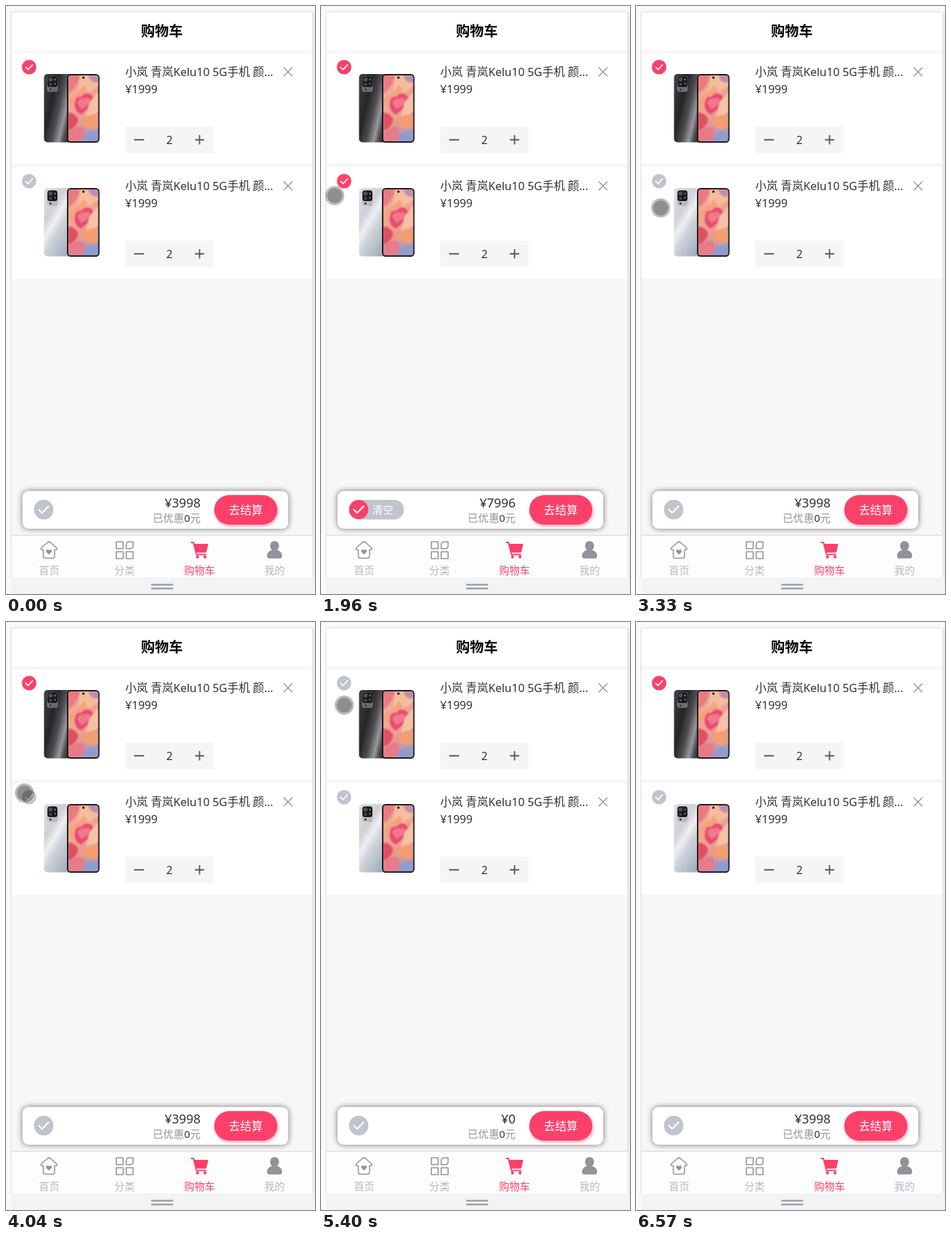
An HTML page that plays this animation: 451 by 856 pixels, repeating every 7.24 s.

```html
<!DOCTYPE html>
<html lang="zh-CN">
<head>
<meta charset="utf-8">
<title>购物车</title>
<style>
  html, body { margin: 0; width: 100%; height: 100%; overflow: hidden; background: #f8f9fa; }
  svg { display: block; width: 451px; height: 856px; }
  text { font-family: "Noto Sans", "Noto Sans CJK SC", sans-serif; font-size: 16.5px; fill: #303133; }
  .mid { text-anchor: middle; }
  .end { text-anchor: end; }
  .title { font-size: 20.3px; font-weight: 700; fill: #000; }
  .total { font-size: 18.4px; }
  .note { font-size: 15.3px; fill: #919398; }
  .tab { font-size: 15px; fill: #b4b9c2; }
  .pink { fill: #fb4069; }
  .gray { fill: #c0c4cd; }
  .white { fill: #fff; }
  .tick { fill: none; stroke: #fff; stroke-linecap: round; stroke-linejoin: round; }
  .bar { filter: drop-shadow(0 0 4px rgba(0, 0, 0, .55)); }
  .pay { filter: drop-shadow(1px 2px 2px rgba(251, 64, 105, .55)); }

  .both, .one, .none, .first, .cursor { animation: 7240ms step-end infinite; }
  .both { animation-name: both; }
  .one { animation-name: one; }
  .none { animation-name: none-left; }
  .first { animation-name: first; }
  .pill { animation: pill 7240ms linear infinite; }
  .clear { animation: clear 7240ms linear infinite; }
  .cursor { animation-name: seen; }
  .path { animation: path 7240ms step-end infinite; }

  @keyframes both { 0% { opacity: 0 } 19.751% { opacity: 1 } 43.094%, 100% { opacity: 0 } }
  @keyframes one {
    0% { opacity: 1 } 19.751% { opacity: 0 } 43.094% { opacity: 1 }
    69.061% { opacity: 0 } 78.453%, 100% { opacity: 1 }
  }
  @keyframes none-left { 0% { opacity: 0 } 69.061% { opacity: 1 } 78.453%, 100% { opacity: 0 } }
  @keyframes first { 0% { opacity: 1 } 69.061% { opacity: 0 } 78.453%, 100% { opacity: 1 } }
  @keyframes pill { 0%, 19.751% { width: 28px } 22.652%, 43.094% { width: 80px } 45.5%, 100% { width: 28px } }
  @keyframes clear { 0%, 20.7% { opacity: 0 } 22.652%, 43.094% { opacity: 1 } 44.5%, 100% { opacity: 0 } }
  @keyframes seen { 0% { opacity: 0 } 4.282% { opacity: 1 } 90.746%, 100% { opacity: 0 } }
  @keyframes path {
    0% { transform: translate(370px, 816px) }
    4.282% { transform: translate(370px, 816px); animation-timing-function: steps(3) }
    7.182% { transform: translate(244px, 590px); animation-timing-function: steps(2) }
    9.116% { transform: translate(130px, 432px) }
    10.083% { transform: translate(104px, 405px); animation-timing-function: steps(2) }
    12.017% { transform: translate(45px, 300px); animation-timing-function: steps(2) }
    14.088% { transform: translate(25px, 260px) }
    15.055% { transform: translate(29px, 257px) }
    17.818% { transform: translate(29px, 256px); animation-timing-function: steps(4) }
    21.685% { transform: translate(30px, 255px); animation-timing-function: steps(5) }
    27.072% { transform: translate(20px, 276px) }
    28.039% { transform: translate(21px, 275px); animation-timing-function: steps(4) }
    31.768% { transform: translate(25px, 268px); animation-timing-function: steps(6) }
    37.569% { transform: translate(36px, 253px) }
    42.127% { transform: translate(36px, 252px) }
    43.094% { transform: translate(36px, 253px); animation-timing-function: steps(3) }
    45.994% { transform: translate(36px, 294px); animation-timing-function: steps(3) }
    48.895% { transform: translate(44px, 408px); animation-timing-function: steps(4) }
    52.901% { transform: translate(36px, 277px); animation-timing-function: steps(3) }
    55.801% { transform: translate(27px, 249px); animation-timing-function: steps(2) }
    57.735% { transform: translate(15px, 215px); animation-timing-function: steps(2) }
    59.669% { transform: translate(16px, 150px); animation-timing-function: steps(3) }
    62.431% { transform: translate(39px, 97px); animation-timing-function: steps(3) }
    65.331% { transform: translate(36px, 92px) }
    68.094% { transform: translate(32px, 91px); animation-timing-function: steps(2) }
    69.89% { transform: translate(31px, 90px); animation-timing-function: steps(2) }
    71.823% { transform: translate(34px, 120px) }
    74.586% { transform: translate(34px, 121px); animation-timing-function: steps(4) }
    78.453% { transform: translate(35px, 93px) }
    80.387% { transform: translate(35px, 93px); animation-timing-function: steps(4) }
    83.978% { transform: translate(35px, 116px) }
    84.945% { transform: translate(50px, 135px) }
    85.912% { transform: translate(130px, 265px) }
    86.878% { transform: translate(258px, 445px); animation-timing-function: steps(2) }
    88.812% { transform: translate(416px, 665px) }
    89.779%, 100% { transform: translate(440px, 721px) }
  }
</style>
</head>
<body>
<svg viewBox="0 0 451 856" xmlns="http://www.w3.org/2000/svg">
  <defs>
    <linearGradient id="black" x1="0" y1=".2" x2="1" y2=".75">
      <stop offset="0" stop-color="#3c3c3f"/><stop offset=".3" stop-color="#252527"/>
      <stop offset=".52" stop-color="#4c4c50"/><stop offset=".72" stop-color="#97989b"/>
      <stop offset=".85" stop-color="#4a4a4d"/><stop offset="1" stop-color="#252527"/>
    </linearGradient>
    <linearGradient id="silver" x1="0" y1="0" x2=".7" y2="1">
      <stop offset="0" stop-color="#dfe0e3"/><stop offset=".35" stop-color="#cfd1d6"/>
      <stop offset=".5" stop-color="#eeeff1"/><stop offset=".65" stop-color="#cdd2d9"/>
      <stop offset="1" stop-color="#a3b0c0"/>
    </linearGradient>
    <linearGradient id="wall" x1="0" y1="0" x2=".4" y2="1">
      <stop offset="0" stop-color="#d98593"/><stop offset=".3" stop-color="#f2ac94"/>
      <stop offset=".7" stop-color="#ee9c90"/><stop offset="1" stop-color="#a79bc4"/>
    </linearGradient>
    <clipPath id="screen"><rect x="91" y="101" width="43.5" height="96" rx="3.5"/></clipPath>
    <filter id="soft"><feGaussianBlur stdDeviation=".9"/></filter>

    <g id="tick">
      <circle r="10.5"/>
      <path class="tick" stroke-width="1.7" d="M-5 .2-1.6 3.6 5-3.4"/>
    </g>
    <g id="big-tick">
      <circle r="14"/>
      <path class="tick" stroke-width="2.3" d="M-7 .3-2.3 5 7-4.6"/>
    </g>

    <g id="phone">
      <rect x="55.5" y="99" width="42" height="99.5" rx="5" style="fill:var(--back)"/>
      <rect x="60" y="102" width="15.5" height="23" rx="3.5" fill="#a4a6aa" fill-opacity=".55"/>
      <rect x="60.500" y="102.500" width="14.5" height="15.5" rx="3.5" fill="#17181b"/>
      <circle cx="65" cy="107" r="3" fill="#4d5057"/>
      <circle cx="65" cy="114" r="2.2" fill="#43464d"/>
      <circle cx="71.500" cy="107" r="1.5" fill="#6b6e74"/>
      <circle cx="71.500" cy="113" r="1.5" fill="#5d6066"/>
      <circle cx="65" cy="121.500" r="1.6" fill="#333539"/>
      <rect x="89" y="99" width="47.5" height="100" rx="5.5" fill="#19191b"/>
      <g clip-path="url(#screen)">
        <path fill="url(#wall)" d="M91 101h44v96H91z"/>
        <g filter="url(#soft)">
          <path fill="#e97a80" d="M91 101h17q-3 16-17 26z"/>
          <path fill="#f5bd9c" d="M108 101h27v15q-16 11-31 20z"/>
          <path fill="#c08db0" d="M120 101h15v10q-11 3-15-10z"/>
          <path fill="#f4a382" d="M91 135q14-8 23-20l6 9q-12 17-29 24z"/>
          <path fill="#e94c70" d="M100 143q1-13 10-11 7-9 15-2 7 9-3 18l-13 10q-9-5-9-15z"/>
          <path fill="#f2788c" d="M104 141q3-8 10-6 6-4 9 2-2 8-13 13z"/>
          <path fill="#f6c2a6" d="M122 140l13-15v29l-20 13z"/>
          <path fill="#df5060" d="M91 155q10 1 14 9 1 10-14 18z"/>
          <path fill="#f29d72" d="M109 170q8-14 26-12v20q-14 6-26-8z"/>
          <path fill="#e77b88" d="M91 184q12-12 21-7l8 20H91z"/>
          <path fill="#8f9bcb" d="M111 197q2-13 16-14l8 3v11z"/>
        </g>
      </g>
      <circle cx="113" cy="104.2" r="1.7" fill="#161618"/>
    </g>

    <g id="card">
      <use href="#phone"/>
      <text x="174" y="102">小岚 青岚Kelu10 5G手机 颜...</text>
      <text x="174" y="127">¥1999</text>
      <path d="M405.3 89.5 418 102.2M418 89.5 405.3 102.2" stroke="#909399" stroke-width="1.4"/>
      <path fill="#f5f5f5" d="M174 175.5h129V214H174z"/>
      <path d="M187 194.7h14.500M275.8 194.7h13.500M282.5 188v13.500" stroke="#55575b" stroke-width="1.9"/>
      <text class="mid" x="238.5" y="201" style="font-size:16px">2</text>
    </g>
  </defs>

  <path fill="#f8f9fa" d="M0 0h451v856H0z"/>
  <path fill="#eaecef" d="M447.5 9H451v823h-3.5z"/>
  <path fill="#f1f3f4" d="M8 832h443v24H8z"/>
  <path fill="#f7f7f7" d="M8 9h439.5v823H8z"/>
  <path fill="#fff" d="M8 9h439.5v55H8zM8 69h439.5v160H8zM8 235h439.5v162H8z"/>
  <path fill="none" stroke="#dcdddf" d="M7.5 832V8.5h440V832"/>
  <text class="mid title" x="227.5" y="44">购物车</text>

  <use href="#card" style="--back:url(#black)"/>
  <use href="#card" y="166" style="--back:url(#silver)"/>
  <use href="#tick" class="gray" x="33.7" y="89"/>
  <use href="#tick" class="pink first" x="33.7" y="89"/>
  <use href="#tick" class="gray" x="33.7" y="255"/>
  <use href="#tick" class="pink both" x="33.7" y="255"/>

  <rect class="bar white" x="24" y="706" width="388" height="55" rx="9"/>
  <rect class="gray pill" x="41" y="719" width="28" height="28.5" rx="14"/>
  <text class="clear white" x="75" y="739" style="font-size:15.3px">清空</text>
  <use href="#big-tick" class="gray" x="55" y="733"/>
  <use href="#big-tick" class="pink both" x="55" y="733"/>
  <text class="end total one" x="284" y="729.5">¥3998</text>
  <text class="end total both" x="284" y="729.5">¥7996</text>
  <text class="end total none" x="284" y="729.5">¥0</text>
  <text class="end note" x="284" y="751">已优惠<tspan fill="#303133">0</tspan>元</text>
  <rect class="pink pay" x="304" y="712" width="92" height="43" rx="21.5"/>
  <text class="mid white" x="350" y="739.5">去结算</text>

  <path fill="#fdfdfd" d="M8 770h439.5v62H8z"/>
  <path stroke="#d6d7d9" d="M8 770.5h439.5"/>
  <g fill="none" stroke="#909399" stroke-width="1.6" stroke-linejoin="round">
    <path d="M54.5 791.5H52q-2-1 0-3l9-8q1.700-1.300 3.400 0l9 8q2 2 0 3h-2.600v10q0 2.200-2.200 2.200H56.700q-2.200 0-2.200-2.200z"/>
    <path d="M161 780h10v10h-10zM161 794.5h10v10h-10zM175.5 794.5h10v10h-10zM175.5 790v-6q0-4 4-4h6v6q0 4-4 4z"/>
  </g>
  <path fill="#909399" d="M62.7 798.5l-3.6-3.6q-1.300-2.600 1-3.500 1.800-.4 2.600 1.200.8-1.600 2.600-1.200 2.300.9 1 3.500z"/>
  <path class="pink" d="M273.5 783h20.600q1.200.2.900 1.500l-2.500 10q-.4 1.300-1.800 1.300h-14.200z"/>
  <path fill="none" stroke="#fb4069" stroke-width="2" stroke-linecap="round" stroke-linejoin="round" d="M270.5 781h3.200l4.300 17.500h13.500"/>
  <circle class="pink" cx="279.5" cy="802" r="2.2"/>
  <circle class="pink" cx="290.5" cy="802" r="2.2"/>
  <path fill="#909399" d="M392 779c4 0 6.500 3 6.500 6.700 0 3-1.300 5.300-3 6.500 5 1 7.500 4 7.500 8.300 0 2.500-1.200 3.700-3.500 3.700h-15c-2.300 0-3.500-1.200-3.500-3.700 0-4.300 2.500-7.300 7.500-8.300-1.700-1.200-3-3.500-3-6.500 0-3.700 2.500-6.700 6.500-6.700z"/>
  <text class="mid tab" x="63" y="827">首页</text>
  <text class="mid tab" x="173" y="827">分类</text>
  <text class="mid tab pink" x="282.5" y="827">购物车</text>
  <text class="mid tab" x="392" y="827">我的</text>
  <path d="M213 842.5h30M213 848h30" stroke="#9aa0a6" stroke-width="2.4" stroke-linecap="round"/>

  <g class="cursor">
    <g class="path">
      <circle r="11" fill="#000" fill-opacity=".44"/>
      <circle r="12.5" fill="none" stroke="#000" stroke-opacity=".26" stroke-width="3"/>
    </g>
  </g>
</svg>
</body>
</html>
```
